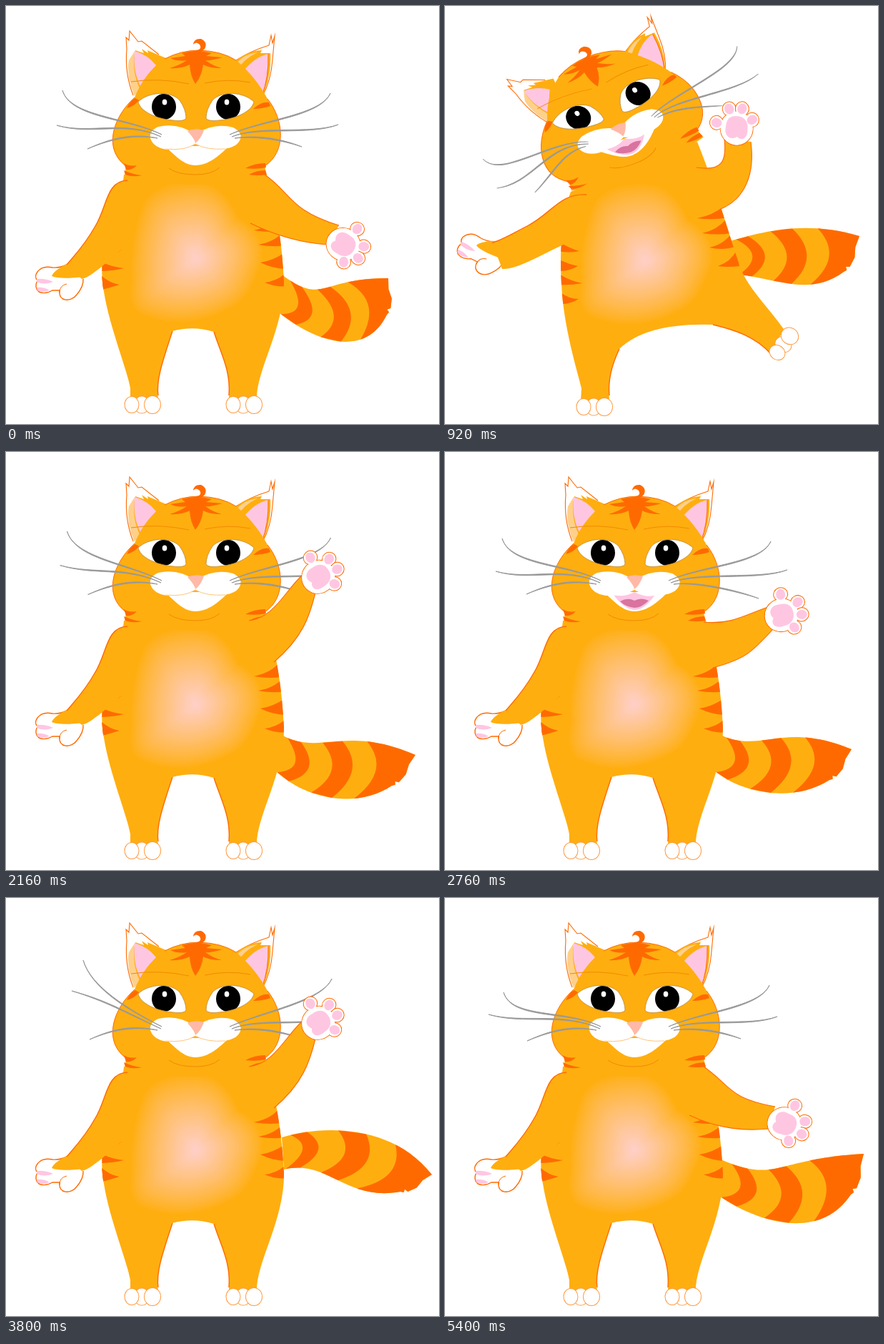
An HTML page with a canvas that plays this animation: 606 px wide and 585 px high, repeating every 5440 ms.

```html
<!DOCTYPE html>
<html lang="en">
<head>
<meta charset="utf-8">
<title>Dancing cat</title>
<style>
html, body { margin: 0; width: 100%; height: 100%; overflow: hidden; background: #fff; }
canvas { display: block; }
</style>
</head>
<body>
<canvas id="stage" width="606" height="585"></canvas>
<script>
const ctx = document.getElementById('stage').getContext('2d');
const LOOP = 5440, STEP = 40;
const FUR = '#ffae0f', DARK = '#ff6a00', PALE = '#ffd08a', PINK = '#ffc6e2', GREY = '#999';
const NUM = /-?\d+(\.\d+)?/g;

// Blends two strings that differ only in their numbers.
function mix(a, b, k) {
  const to = b.match(NUM);
  let i = 0;
  return a.replace(NUM, v => (+v + (to[i++] - v) * k).toFixed(2));
}
const nums = s => s.match(NUM).map(Number);

// Value of a keyframe track at time t, eased between keys.
function track(keys, t) {
  let i = 0;
  while (i < keys.length - 1 && keys[i + 1][0] <= t) i++;
  const [t0, a] = keys[i];
  if (i === keys.length - 1) return a;
  const [t1, b] = keys[i + 1], u = Math.max(0, (t - t0) / (t1 - t0));
  return mix(a, b, u * u * (3 - 2 * u));
}

function fill(d, color) {
  ctx.fillStyle = color;
  ctx.fill(new Path2D(d));
}
function line(d, color = DARK, w = 1.4) {
  ctx.strokeStyle = color;
  ctx.lineWidth = w;
  ctx.stroke(new Path2D(d));
}
function oval(x, y, rx, ry, color, edge, rot = 0) {
  ctx.beginPath();
  ctx.ellipse(x, y, rx, ry, rot, 0, 7);
  if (edge) { ctx.strokeStyle = edge; ctx.lineWidth = 2; ctx.stroke(); }
  ctx.fillStyle = color;
  ctx.fill();
}
function group(x, y, rot, draw) {
  ctx.save();
  ctx.translate(x, y);
  ctx.rotate(rot);
  draw();
  ctx.restore();
}
function clipped(d, draw) {
  ctx.save();
  ctx.clip(new Path2D(d));
  draw();
  ctx.restore();
}

// Standing and dancing shapes
const body = [
  'M165,236 C160,290 125,330 137,400 C145,450 170,510 174,535 L174,550 L213,550 C210,525 218,500 233,455 Q262,447 291,456 C300,485 315,510 312,550 L351,550 C350,510 390,450 389,385 C386,330 380,290 365,236 Z',
  'M176,260 C165,290 160,330 163,390 C166,450 185,510 191,535 L190,553 L230,553 C228,525 232,505 244,480 Q282,443 375,446 C405,453 435,463 456,487 L474,452 C455,425 425,395 415,370 C400,330 385,270 353,190 Z'];
const legs = [
  'M213,545 C210,525 218,500 233,455 M291,456 C300,485 315,510 312,545',
  'M230,545 C228,525 232,505 244,480 M375,446 C405,453 435,463 456,487'];
const leftArm = [
  'M170,244 C140,245 142,280 125,308 C110,335 95,350 85,362 L106,382 C120,380 150,350 165,338',
  'M198,264 C160,262 150,290 115,308 C95,318 75,330 66,331 L80,368 C100,370 140,345 170,332'];
// Stripe: edge top, tip, edge bottom
const stripes = [
  ['M384,292 Q374,308 347,314 Q372,318 390,314', 'M390,280 Q375,293 353,297 Q375,300 396,296'],
  ['M388,316 Q376,330 353,334 Q375,338 390,335', 'M394,298 Q380,314 360,318 Q382,321 400,318'],
  ['M390,345 Q375,356 356,359 Q375,368 392,368', 'M402,317 Q390,334 370,338 Q390,343 408,336'],
  ['M392,373 Q380,385 362,387 Q378,394 392,392', 'M408,342 Q400,358 382,364 Q395,366 412,364'],
  ['M130,338 Q150,346 162,341 Q150,352 130,350', 'M158,328 Q170,338 188,343 Q172,346 158,343'],
  ['M130,356 Q145,365 165,367 Q150,371 130,371', 'M158,354 Q172,361 186,364 Q172,372 158,371'],
  ['M130,374 Q142,387 158,390 Q146,394 130,398', 'M158,374 Q175,385 192,388 Q175,391 158,390'],
  ['M130,374 Q142,387 158,390 Q146,394 130,398', 'M158,398 Q172,410 187,410 Q175,418 158,417']];
// Belly patch around its own centre
const belly = 'M-3,-110 C32,-110 50,-86 62,-58 C94,-40 102,-14 94,10 C84,34 76,62 46,74 C8,94 -36,98 -74,82 C-94,74 -96,58 -92,28 C-94,-12 -86,-52 -74,-80 C-60,-104 -30,-110 -3,-110Z';

// Right arm outline, then hand x, y and angle
const A0 = 'M362,236 C400,262 395,285 466,307 L450,334 C420,332 385,325 342,304|473,334,20';
const A1 = 'M352,226 C390,232 394,215 391,186 L428,190 C434,235 420,270 386,284|408,170,-97';
const A2 = 'M362,236 C390,232 395,210 401,182 L428,195 C430,240 415,275 375,296|423,172,-70';
const A3 = 'M362,238 C400,242 420,228 452,217 L460,247 C430,280 420,290 375,302|472,228,-25';
const A4 = 'M340,236 C375,232 390,195 414,173 L433,197 C425,230 415,260 375,294|438,174,-45';
const A5 = 'M362,236 C392,232 396,215 398,190 L430,193 C432,240 412,275 375,296|417,178,-87';
const A6 = 'M362,236 C400,262 395,280 462,292 L453,323 C420,326 385,324 342,304|476,316,8';
const A7 = 'M362,236 C385,238 400,215 422,198 L440,222 C428,250 415,275 375,298|442,198,-45';
const armKeys = [[0, A0], [440, A1], [1160, A1], [1500, A2], [1600, A2], [2160, A4], [2760, A3],
  [3280, A5], [3800, A4], [4280, A3], [4760, A5], [5040, A7], [5400, A6], [5440, A0]];

// Tail: upper and lower edge as cubic curves
const T0 = '386,376 445,420 440,380 535,381 383,430 440,475 505,490 533,432';
const T1 = '398,329 440,318 500,298 580,322 410,376 460,380 510,408 558,372';
const T2 = '385,393 450,430 450,355 558,369 380,446 430,475 510,475 545,424';
const T3 = '382,394 440,425 470,375 569,416 378,447 420,480 490,490 538,459';
const T4 = '386,335 440,318 540,315 596,387 389,380 450,365 475,425 552,411';
const T5 = '386,343 450,338 535,335 585,397 388,391 440,398 470,440 541,426';
const T6 = '386,366 465,400 460,365 586,358 385,418 440,455 525,480 568,415';
const T7 = '386,333 440,316 530,310 582,375 389,379 450,365 470,425 542,405';
const T8 = '382,394 440,428 470,380 573,424 378,447 420,486 490,500 540,467';
const tailKeys = [[0, T0], [480, T4], [920, T1], [1240, T4], [1560, T2], [2120, T8], [2760, T3],
  [3000, T8], [3800, T4], [3960, T7], [4400, T7], [4760, T5], [5040, T6]];

// Whisker tips, three left and three right
const W0 = '79,118 71,167 114,200 454,122 465,166 414,197';
const W1 = '75,145 74,193 119,220 465,131 474,181 409,205';
const W3 = '80,121 71,167 114,199 456,125 479,165 439,205';
const W4 = '108,87 92,130 117,198 456,113 465,166 414,197';
const W5 = '82,132 61,163 115,200 454,122 465,166 414,197';
const whiskerKeys = [[0, W0], [440, W1], [1120, W1], [1500, W0], [1720, W0], [1980, W4], [2240, W0],
  [2760, W3], [3360, W0], [3720, W4], [3920, W4], [4400, W5]];
// Root, first control and tip-relative second control
const whiskers = [
  [218, 180, 170, 155, 11, 37], [217, 183, 165, 158, 49, 13], [212, 185, 180, 178, 36, -17],
  [313, 180, 360, 158, -14, 31], [316, 183, 355, 166, -40, 14], [320, 185, 350, 180, -30, -12]];

const danceKeys = [[0, '0'], [440, '1'], [1120, '1'], [1500, '0']];
const earKeys = [[1400, '0'], [1540, '0.13'], [1580, '0.11'], [1720, '0']];

function cubic(p, t) {
  const u = 1 - t, w = [u * u * u, 3 * u * u * t, 3 * u * t * t, t * t * t];
  const sum = o => w.reduce((s, v, i) => s + v * p[2 * i + o], 0);
  return [sum(0), sum(1)];
}

function drawTail(t) {
  const n = nums(track(tailKeys, t)), top = n.slice(0, 8), low = n.slice(8);
  const [x, y] = top.slice(6), [ex, ey] = low.slice(6);
  const dx = ex - x, dy = ey - y, len = Math.hypot(dx, dy);
  // Ragged tip
  const tip = [[.3, 1], [.55, 6], [.82, 5], [.86, 0], [.93, 3]].map(([s, o]) =>
    `L${x + dx * s + dy / len * o},${y + dy * s - dx / len * o}`).join(' ');
  const shape = `M${top.slice(0, 2)} C${top.slice(2)} ${tip} L${ex},${ey} C${low.slice(4, 6)} ${low.slice(2, 4)} ${low.slice(0, 2)} Z`;
  fill(shape, FUR);
  // Stripes lean forward along the upper edge
  const edge = s => {
    const a = cubic(top, s + .04), b = cubic(low, s - .02), c = cubic(top, s + .09), d = cubic(low, s + .03);
    const vx = c[0] + d[0] - a[0] - b[0], vy = c[1] + d[1] - a[1] - b[1], v = 42 / Math.hypot(vx, vy);
    return { a, b, mid: [(a[0] + b[0]) / 2 + vx * v, (a[1] + b[1]) / 2 + vy * v] };
  };
  clipped(shape, () => {
    for (const [s, e] of [[.03, .15], [.35, .52], [.7, 0]]) {
      const p = edge(s), q = e && edge(e);
      fill(`M${p.a} Q${p.mid} ${p.b} ` + (q ? `L${q.b} Q${q.mid} ${q.a}Z` : 'L620,600 L620,250Z'), DARK);
    }
  });
}

function foot(x, y, rot) {
  group(x, y, rot, () => {
    oval(-1, 0, 10, 11.5, '#fff', '#ff9a40');
    oval(-15, 0, 9.5, 11, '#fff', '#ff9a40');
    oval(14, 0, 11, 12, '#fff', '#ff9a40');
  });
}

function drawBelly(k) {
  group(265 + 15 * k, 353 + 3 * k, 0, () => {
    const STEPS = 30;
    for (let i = 0; i < STEPS; i++) {
      const u = i / STEPS, c = u ** .85;
      ctx.save();
      ctx.scale(1 - u, 1 - u);
      fill(belly, `rgb(255,${174 + 34 * c},${15 + 189 * c})`);
      ctx.restore();
    }
  });
}

function drawLeftHand(k) {
  group(75 - 25 * k, 387 - 39 * k, .44 * k, () => {
    const hand = 'M10,-25 Q0,-20 -10,-21 Q-24,-24 -31,-15 Q-36,-8 -31,-3 Q-36,7 -29,13 Q-20,17 -10,11 L0,11 C-2,27 16,28 24,17 Q34,5 33,-5';
    fill(hand, '#fff');
    line(hand, DARK, 1.4);
    fill('M18,-30 Q-8,-18 -11,-9 Q0,-4 34,-8 L36,-14Z', FUR);
    fill('M-32,-5 Q-20,-6 -9,-1 Q-22,4 -32,-1Z', PINK);
    fill('M-32,7 Q-22,6 -14,11 Q-24,15 -31,11Z', PINK);
    line('M0,14 Q0,4 10,2', DARK, 1);
  });
}

function drawBody(k) {
  const m = pair => mix(pair[0], pair[1], k);
  const shape = m(body), arm = m(leftArm);
  fill(shape, FUR);
  line(m(legs));
  clipped(shape, () => {
    drawBelly(k);
    stripes.forEach(s => fill(m(s), DARK));
  });
  foot(191 + 18 * k, 558 + 3 * k, 0);
  foot(333 + 141 * k, 558 - 85 * k, -.92 * k);
  drawLeftHand(k);
  fill(arm, FUR);
  line(arm.replace(/ L.*/, ''));
}

function drawEyes() {
  for (const side of [1, -1]) {
    ctx.save();
    ctx.translate(266, 0);
    ctx.scale(side, 1);
    const eye = 'M-81,134 C-66,120 -36,118 -23,132 Q-14,145 -14,157 Q-17,162 -32,160 C-55,158 -78,148 -81,134Z';
    fill(eye, '#fff');
    clipped(eye, () => oval(-45, 141, 17, 18, '#000'));
    line(eye, '#b98a3c', .8);
    ctx.restore();
    oval(side > 0 ? 222 : 309, 134.5, 3.3, 4, '#fff');
  }
}

function drawMouth(open) {
  fill('M222,196 C236,208 248,223 265,223 C284,223 300,208 312,196Z', '#fff');
  if (open) {
    fill('M236,200 Q250,204 265,196 Q280,204 293,201 Q279,221 265,221 Q251,220 236,200Z', PINK);
    fill('M245,209 Q256,203 265,208 Q275,203 285,208 Q275,218 265,218 Q253,217 245,209Z', '#d9739f');
  }
  const lip = 'M223,200 Q250,203 265,193 Q281,202 307,200';
  fill('M262,178 Q240,163 213,169 Q200,175 202,185 Q206,198 225,201 Q250,202 265,193 Q280,202 304,200 Q324,198 328,186 Q331,177 318,170 Q292,163 268,178Z', '#fff');
  if (!open) line(lip, '#ffc57a', 1);
  fill('M254,175 Q265,170 277,174 Q272,187 265,192 Q264,186 254,175Z', '#ffb9a6');
}

function drawHead(t, k, open) {
  // Ears
  group(190, 110 + 7 * k, -.24 * k, () => {
    ctx.translate(-190, -110);
    const ear = 'M178,125 Q166,95 169,60 L168,44 L172,48 L173,35 L185,50 L190,49 L214,68';
    fill(ear, '#fff');
    line(ear, DARK, 1.1);
    fill('M184,128 Q172,90 181,62 L193,66 L190,60 L199,66 L198,62 L224,73 L215,110Z', FUR);
    fill('M180,126 Q168,98 172,76 L180,63 Q176,92 187,115Z', PALE);
    fill('M180,63 Q198,68 210,83 Q198,95 189,114 Q177,92 180,63Z', PINK);
  });
  group(340, 110, +track(earKeys, t), () => {
    ctx.translate(-340, -110);
    const ear = 'M322,76 Q342,63 368,55 L371,41 L373,52 L376,42 L373,75 Q371,104 359,126';
    fill(ear, '#fff');
    line(ear, DARK, 1.1);
    fill('M318,80 Q338,62 358,62 L356,66 L370,66 Q372,98 358,128 L325,110Z', FUR);
    fill('M317,88 Q328,68 352,65 Q332,74 322,92Z', PALE);
    fill('M328,97 Q345,72 367,67 Q368,100 358,126 Q350,106 328,97Z', PINK);
    line('M367,67 Q368,100 358,126', DARK, 1);
  });
  // Skull and markings
  fill('M222,74 Q245,62 270,62 Q302,63 322,76 C345,95 360,118 366,130 C390,160 392,205 362,224 L365,238 Q265,262 166,238 L168,224 C135,200 150,155 180,128 C190,105 200,90 222,74Z', FUR);
  line('M222,74 Q245,62 270,62 Q302,63 322,76 M366,130 C390,160 392,205 362,224 M168,224 C135,200 150,155 180,128', DARK, 1);
  fill('M246,66 Q267,60 288,66 L280,70 L303,72 Q285,77 279,76 Q290,84 302,87 Q284,87 276,82 Q274,98 265,109 Q258,98 257,82 Q246,88 229,87 Q243,83 253,76 Q240,78 230,73 L251,70Z', DARK);
  fill('M261,63 Q276,62 271,54 Q266,49 262,54 Q263,45 273,46 Q283,51 278,60 L272,65Z', DARK);
  fill('M169,143 Q174,132 181,129 L186,132 Q180,140 169,143Z', DARK);
  fill('M346,144 Q358,133 368,135 L370,140 Q358,144 346,144Z', DARK);
  fill('M165,220 Q172,225 183,223 Q177,230 168,229Z M165,230 Q178,236 190,237 Q178,240 167,236Z', DARK);
  fill('M363,220 Q348,220 335,227 Q350,229 364,226Z M363,230 Q350,230 340,236 Q352,238 365,236Z', DARK);
  line('M175,106 Q214,100 256,109 M278,108 Q310,101 342,107 M228,227 Q240,236 265,236 Q288,236 299,226', '#ef8c00', 1);
  drawEyes();
  drawMouth(open);
  const tips = nums(track(whiskerKeys, t));
  whiskers.forEach(([x, y, cx, cy, ox, oy], i) => {
    const tx = tips[2 * i], ty = tips[2 * i + 1];
    const d = `M${x},${y} C${cx},${cy} ${tx + ox},${ty + oy} ${tx},${ty} C${tx + ox},${ty + oy + 2} ${cx},${cy + 2} ${x},${y}Z`;
    fill(d, GREY);
    line(d, GREY, 1);
  });
}

const toes = [[10, -27], [27, -7], [25, 11], [8, 23]];
function drawRightArm(t) {
  const [arm, hand] = track(armKeys, t).split('|');
  const [x, y, deg] = nums(hand);
  fill(arm, FUR);
  const [inner, outer] = arm.split(' L');
  line(inner, DARK, 1.1);
  line('M' + outer, DARK, 1.1);
  group(x, y, deg * Math.PI / 180, () => {
    oval(-1, 0, 23.5, 22.5, '#fff', DARK);
    toes.forEach(([a, b]) => oval(a, b, 9.5, 9, '#fff', DARK));
    oval(-1, 0, 23.5, 22.5, '#fff');
    toes.forEach(([a, b]) => oval(a, b, 7.5, 6.5, PINK, '', Math.atan2(b, a)));
    fill('M16,-4 C17,12 6,18 -4,15 C-18,14 -20,4 -13,-1 C-18,-12 -8,-19 2,-15 Q14,-13 16,-4Z', PINK);
  });
}

function draw(t) {
  const k = +track(danceKeys, t);
  const open = (t >= 280 && t < 1360) || (t >= 2280 && t < 3200);
  ctx.fillStyle = '#fff';
  ctx.fillRect(0, 0, 606, 585);
  drawTail(t);
  drawBody(k);
  group(265.5 - 37.5 * k, 141 - 1.5 * k, -.384 * k, () => {
    // The tilted head is slightly sheared and squashed
    ctx.transform(1, 0, .08 * k, 1 - .06 * k, 0, 0);
    ctx.translate(-265.5, -141);
    drawHead(t, k, open);
  });
  drawRightArm(t);
}

const start = performance.now();
function tick() {
  const t = (performance.now() - start) % LOOP;
  draw(Math.floor(t / STEP) * STEP);
  requestAnimationFrame(tick);
}
tick();
</script>
</body>
</html>
```
